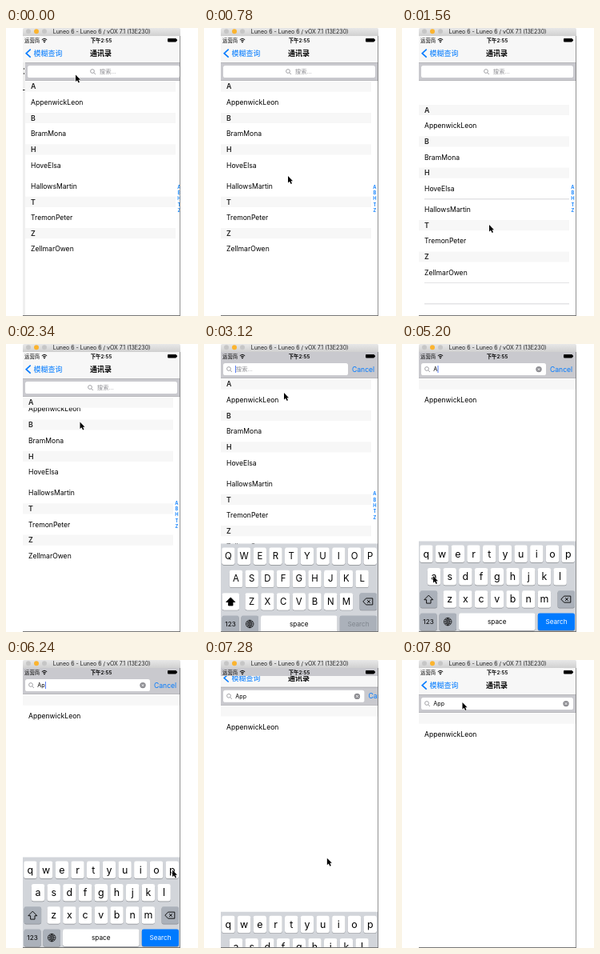
These frames come from a looping animation (240x360 px, 8 s). An HTML page with a canvas:

```html
<!DOCTYPE html>
<html lang="zh-CN">
<head>
<meta charset="utf-8">
<title>通讯录</title>
<style>
html, body { margin: 0; width: 100%; height: 100%; overflow: hidden; background: #fff; }
canvas { display: block; width: 240px; height: 360px; }
</style>
</head>
<body>
<canvas id="stage"></canvas>
<script>
const canvas = document.getElementById('stage');
const c = canvas.getContext('2d');
const dpr = window.devicePixelRatio || 1;
canvas.width = 240 * dpr;
canvas.height = 360 * dpr;

const LOOP = 8000, TICK = 260;
const FONT = 'Inter, "Noto Sans CJK SC", "Noto Sans CJK", sans-serif';
const BLUE = '#007aff', BAR = '#c9c9ce', GREY = '#8e8e93', PALE = '#f7f7f7';
const L = 21, R = 218, W = R - L;
const HEAD = 13.1, ROW = 26.2, BAR_H = 23;
const contacts = {
  A: ['AppenwickLeon'],
  B: ['BramMona'],
  H: ['HoveElsa', 'HallowsMartin'],
  T: ['TremonPeter'],
  Z: ['ZellmarOwen']
};

// Tracks: [tick, value, ...]
const pointer = [[0, 87, 58.5], [3, 105, 185], [6, 109, 246], [7, 106, 190], [8, 99, 125],
  [9, 92.5, 97.5], [11, 98, 56], [12, 100, 61], [16, 102, 68.5], [19, 39, 290], [20, 39, 290],
  [23, 208, 262.5], [25, 208, 262.5], [27, 193, 345], [30, 75.5, 53]];
const pull = [[0, 0], [3, 0], [6, 29.3], [7, 12], [8, -10], [9, -11.5], [10, 0]];
const focus = [[10, 0], [11, .6], [12, 1], [27, 1], [28, .4], [29, 0]];
const keysUp = [[10, 0], [11, .6], [12, .975], [13, 1], [27, 1], [28, .4], [29, 0]];
const typed = [[25, 'App'], [23, 'Ap'], [20, 'A'], [0, '']];

function at(track, n, i = 1) {
  const k = track.findIndex(p => p[0] > n);
  if (k < 0) return track[track.length - 1][i];
  if (k === 0) return track[0][i];
  const a = track[k - 1], b = track[k];
  return a[i] + (b[i] - a[i]) * (n - a[0]) / (b[0] - a[0]);
}

function text(s, x, y, size, color = '#000', align = 'left', weight = 400) {
  c.font = `${weight} ${size}px ${FONT}`;
  c.fillStyle = color;
  c.textAlign = align;
  c.textBaseline = 'alphabetic';
  c.fillText(s, x, y + size * .36);
}

function rect(x, y, w, h, color, r = 0) {
  c.fillStyle = color;
  c.beginPath();
  c.roundRect(x, y, w, h, r);
  c.fill();
}

function dot(x, y, r, color) {
  c.fillStyle = color;
  c.beginPath();
  c.arc(x, y, r, 0, 7);
  c.fill();
}

function path(d, x, y, stroke, width = 1, fill) {
  const p = new Path2D(d);
  c.save();
  c.translate(x, y);
  if (stroke) { c.strokeStyle = stroke; c.lineWidth = width; c.stroke(p); }
  if (fill) { c.fillStyle = fill; c.fill(p); }
  c.restore();
}

function titleBar() {
  const g = c.createLinearGradient(0, 0, 0, 10);
  g.addColorStop(0, '#e8e8e8');
  g.addColorStop(1, '#d0d0d0');
  rect(L, 0, W, 10, g, [2, 2, 0, 0]);
  ['#c6c6c6', '#fbb42f', '#c6c6c6'].forEach((color, i) => dot(28 + 10 * i, 4.2, 3, color));
  text('Luneo 6 - Luneo 6 / vOX 7.1 (13E230)', 119.7, 4.2, 7, '#222', 'center');
}

function statusBar(color) {
  rect(L, 10, W, 10, color);
  text('运营商', 23, 15.2, 6.4);
  path('M-3.2-1.2Q0-4 3.2-1.2M-1.9.3Q0-1.4 1.9.3', 48, 15.8, '#000', 1);
  dot(48, 17.4, .9, '#000');
  text('下午2:55', 119, 15.2, 6.4, '#000', 'center', 600);
  rect(202, 13, 11, 4.4, '#000', .8);
  rect(213, 14.2, 1, 2, '#000');
}

function navBar(shift) {
  rect(L, 20 - shift, W, BAR_H, PALE);
  path('M5.5-5L0 0L5.5 5', 25.2, 31.7 - shift, BLUE, 1.6);
  text('模糊查询', 34.5, 31.7 - shift, 9, BLUE);
  text('通讯录', 118.5, 31.7 - shift, 9, '#000', 'center', 700);
}

function searchBar(x, top, f, query) {
  rect(x, top, W, BAR_H, BAR);
  if (f < 1) rect(x, top, W, .6, '#a6a6aa');
  rect(x, top + BAR_H - .6, W, .6, '#a6a6aa');
  const fx = x + 3, w = 190 - 34 * f, y = top + 11.6;
  rect(fx, top + 4, w, 15, '#fff', 2.6);
  const gx = query ? 31 : 105 - 74 * f + x - L;
  c.strokeStyle = GREY;
  c.lineWidth = .8;
  c.beginPath();
  c.arc(gx, y - .6, 2.4, 0, 7);
  c.moveTo(gx + 1.7, y + 1.2);
  c.lineTo(gx + 4, y + 3.4);
  c.stroke();
  if (query) {
    text(query, 39.3, y + .3, 7.2);
    const end = 39.6 + c.measureText(query).width;
    if (f === 1) rect(end, y - 4.5, .9, 9, '#426bf2');
    const cx = fx + w - 9;
    dot(cx, y, 3.7, GREY);
    path('M-1.4-1.4L1.4 1.4M1.4-1.4L-1.4 1.4', cx, y, '#fff', .8);
  } else {
    text('搜索...', gx + 8.8, y, 7.4, GREY);
    if (f === 1) rect(39, y - 4.5, .9, 9, '#426bf2');
  }
  if (f > 0) text('Cancel', 185 + 34 * (1 - f), y, 8.6, BLUE);
}

function list(x, top, off, query) {
  c.save();
  c.beginPath();
  c.rect(L, top, W, 360 - top);
  c.clip();
  rect(x, top, W, 360 - top, '#fff');
  if (query) {
    rect(x, top, W, HEAD, PALE);
    text(contacts.A[0], x + 7, top + HEAD + ROW / 2, 8.6);
    c.restore();
    return;
  }
  const line = y => rect(x + 7, y - .3, 181, .6, '#c8c7cc');
  const heads = [];
  let y = top + off;
  for (const [letter, names] of Object.entries(contacts)) {
    const start = y;
    y += HEAD;
    names.forEach((name, i) => {
      if (i && off > 0) line(y);
      text(name, x + 7, y + ROW / 2, 8.6);
      y += ROW;
    });
    heads.push([letter, Math.min(Math.max(start, top), y - HEAD)]);
  }
  if (off > 0) for (; y < 360; y += ROW) line(y);
  for (const [letter, hy] of heads) {
    rect(x, hy, 188, HEAD, PALE);
    text(letter, x + 7, hy + HEAD / 2, 8.8, '#222', 'left', 600);
  }
  const mid = (top + 360) / 2;
  heads.forEach(([letter], i) =>
    text(letter, x + 192.3, mid + (i - 2) * 7.4, 5.8, BLUE, 'center', 600));
  c.restore();
}

function key(x, y, w, color) {
  rect(x, y + .6, w, 21.6, '#898c91', 2.4);
  rect(x, y, w, 21.5, color, 2.4);
}

function keyboard(top, query) {
  const DARK = '#abb1ba';
  rect(L, top, W, 116, '#d2d5da');
  [['QWERTYUIOP', 30.4], ['ASDFGHJKL', 40], ['ZXCVBNM', 59.7]].forEach(([row, x0], r) => {
    const y = top + 5 + r * 28.35;
    [...(query ? row.toLowerCase() : row)].forEach((ch, i) => {
      const x = x0 + i * 19.7;
      key(x - 8.2, y, 16.4, '#fff');
      text(ch, x, y + 10.6, query ? 12.4 : 11.4, '#000', 'center');
    });
  });
  const y3 = top + 61.7, y4 = top + 90;
  key(22.6, y3, 21.5, query ? DARK : '#fff');
  path('M0-5.2L5.5.4H2.7V4.8H-2.7V.4H-5.5Z', 33.3, y3 + 11, '#000', .9, query ? null : '#000');
  key(194.5, y3, 21.5, DARK);
  path('M-6 0L-2.2-4H6V4H-2.2ZM-.8-1.8L3 1.8M3-1.8L-.8 1.8', 204.8, y3 + 10.8, '#000', .9);

  key(22.6, y4, 21, DARK);
  text('123', 33, y4 + 10.5, 8.2, '#000', 'center');
  key(46.5, y4, 21.5, DARK);
  path('M-4.8 0A4.8 4.8 0 1 0 4.8 0A4.8 4.8 0 1 0-4.8 0H4.8M0-4.8V4.8' +
    'M0-4.8Q-4.8 0 0 4.8Q4.8 0 0-4.8M-3.8-2.6Q0-1.2 3.8-2.6M-3.8 2.6Q0 1.2 3.8 2.6',
    57.2, y4 + 10.5, '#000', .7);
  key(71, y4, 95.5, '#fff');
  text('space', 118.7, y4 + 10.5, 8.2, '#000', 'center');
  key(169.8, y4, 46.2, query ? BLUE : DARK);
  text('Search', 193, y4 + 10.5, 8.2, query ? '#fff' : '#7f858d', 'center');
}

// Sliver of the previous page as the push transition ends
function previousPage() {
  rect(L, 43, 3, 317, '#efefef');
  rect(L, 77, 2.5, 1, '#222');
  rect(L + 1, 50, 1, 2, '#555');
  rect(L + 1, 56, 1, 2, '#555');
}

function draw(n) {
  const f = at(focus, n), up = at(keysUp, n);
  const query = typed.find(p => n >= p[0])[1];
  const x = n === 0 ? L + 3 : L;
  const bar = 43 - BAR_H * f;

  c.setTransform(dpr, 0, 0, dpr, 0, 0);
  rect(0, 0, 240, 360, '#fff');
  c.save();
  c.beginPath();
  c.rect(L, 0, W, 360);
  c.clip();
  if (x > L) previousPage();
  list(x, bar + BAR_H + .7, at(pull, n), query);
  if (f < 1) navBar(BAR_H * f);
  searchBar(x, bar, f, query);
  statusBar(f > 0 ? BAR : PALE);
  titleBar();
  if (up > 0) keyboard(360 - 113.4 * up, query);
  rect(R - .8, 10, .8, 350, '#777');
  rect(L, 359, W, 1, '#777');
  c.restore();
  path('M0 0V8.6L2 6.8L3.6 10L5 9.3L3.5 6.2H6Z',
    at(pointer, n), at(pointer, n, 2), '#fff', 1, '#000');
}

function frame() {
  draw(Math.floor(performance.now() % LOOP / TICK));
  requestAnimationFrame(frame);
}
frame();
</script>
</body>
</html>
```
